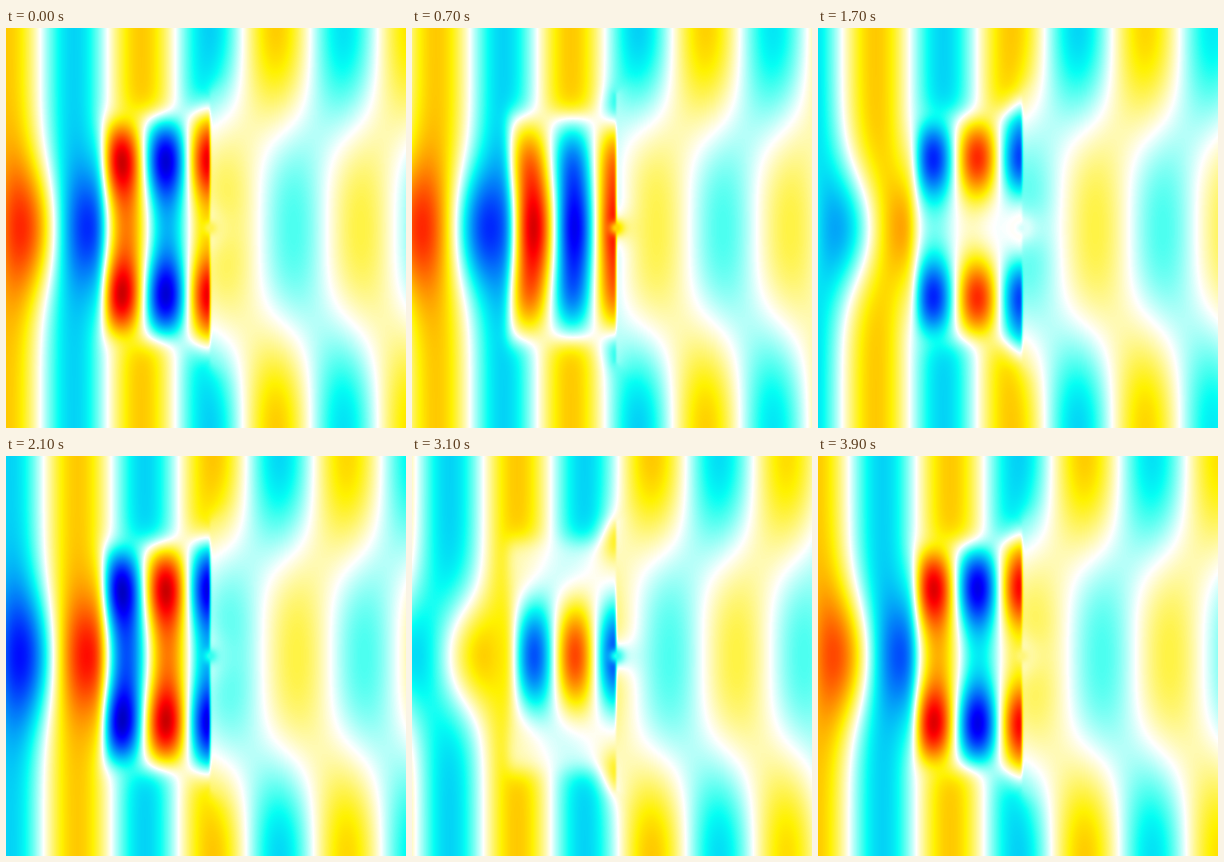
A matplotlib script for the animation above (4 s loop, 400 px wide and 400 px high).

```python
import numpy as np
import matplotlib.pyplot as plt
from matplotlib.animation import FuncAnimation
from matplotlib.colors import LinearSegmentedColormap

SIZE, FRAMES, INTERVAL = 400, 40, 100
WAVELENGTH = 135
K = 2 * np.pi / WAVELENGTH
CREST = 135.5              # a wave crest at time zero
WALL, HALF = 204, 134      # screen position and half height
BOX_LEFT, BOX_HALF = 95, 115

x = np.arange(SIZE) + 0.5
eta = np.abs(x - SIZE / 2)[:, None]   # distance from the axis
depth = WALL - x                      # distance in front of the screen
radius = np.hypot(depth, eta)         # distance from the opening


def wave(travel, amp):
    return amp * np.exp(1j * K * travel)


def bell(distance, width):
    return np.exp(-(distance / width) ** 2)


def step(distance, width):
    return 0.5 * (1 + np.tanh(distance / (2 * width)))


def mix(a, b, weight):
    return a + (b - a) * weight


def front_field():
    """Incident wave, reflected beam and the standing modes of the slow box."""
    gap = np.maximum(BOX_LEFT - x, 0)
    open_side = wave(x - CREST, 1.33) + wave(24 - x, 1.8) * bell(eta, 55 + 0.15 * gap)

    axial = (0.9 + 0.01 * depth + 2.7j) * np.cos(2 * np.pi * depth / 82) * bell(eta, 59)
    lobes = bell(eta - 70, 40) + bell(eta + 70, 40)
    paired = 3.0 * np.cos(2 * np.pi * depth / 89) * lobes

    inside = step(x - BOX_LEFT, 4) * step(BOX_HALF - eta, 7)
    rim = (0.7 - 0.9j) * bell(depth, 18) * bell(eta - 118, 22)
    return mix(open_side, axial + paired, inside) + rim


def back_field():
    """Waves passing around the screen, its shadow and the opening's ripple."""
    behind = np.maximum(-depth, 0)
    shade = (1 + np.cos(2 * np.pi * eta / SIZE)) / 2
    sharp = 1.3 + 0.9 * np.exp(-behind / 70)
    around = wave(x - CREST - WAVELENGTH, 1.38 - 0.0013 * behind)
    ripple = wave(radius, 1.5j) * np.exp(-radius / 12)
    return (1 - shade) ** sharp * around + shade * wave(x - 220, 0.75) + ripple


def total_field():
    softness = 0.7 + np.clip((eta - HALF) / 3, 0, 7)
    field = mix(front_field(), back_field(), step(x - WALL, softness))
    return mix(field, 0.7 + 1.0j, bell(radius, 7))


cmap = LinearSegmentedColormap.from_list("waves", [
    (0.0, (0, 0, 0.5)), (0.125, (0, 0, 1)),
    (0.375, (0.02, 1, 0.96)), (0.4, (0.25, 1, 0.94)),
    (0.5, (1, 1, 1)),
    (0.6, (1, 0.95, 0.22)), (0.625, (1, 0.95, 0)),
    (0.875, (1, 0, 0)), (1.0, (0.5, 0, 0)),
], N=512)

field = total_field()
fig = plt.figure(figsize=(4, 4), dpi=100)
ax = fig.add_axes([0, 0, 1, 1])
ax.axis("off")
image = ax.imshow(field.real, cmap=cmap, vmin=-4, vmax=4,
                  interpolation="nearest", aspect="auto")


def update(frame):
    turn = np.exp(-2j * np.pi * frame / FRAMES)
    image.set_data((field * turn).real)
    return (image,)


anim = FuncAnimation(fig, update, frames=FRAMES, interval=INTERVAL,
                     repeat=True, repeat_delay=0, blit=False)
plt.show()
```
